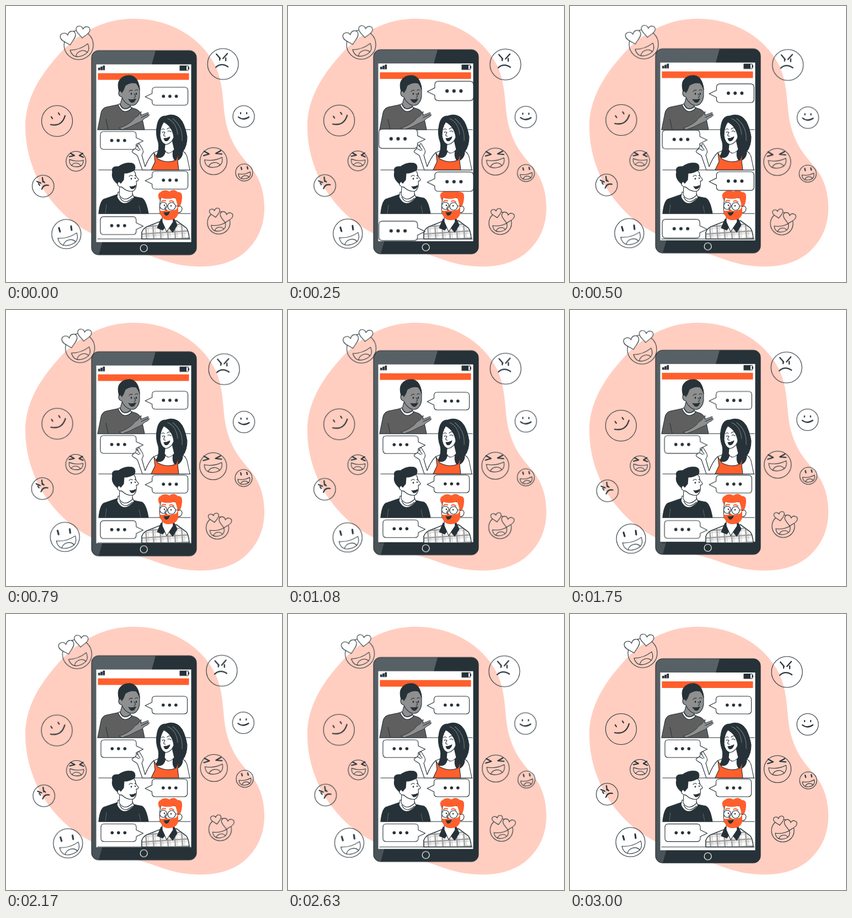
These frames come from a looping animation (500x500 px, 3.04 s). An HTML page:

```html
<!DOCTYPE html>
<html lang="en">
<head>
<meta charset="utf-8">
<title>Group video chat</title>
<style>
  html, body { margin: 0; height: 100%; overflow: hidden; background: #fff; }
  svg { display: block; width: 100vw; height: 100vh; }

  .line { fill: none; stroke: #263238; stroke-width: 1.1; stroke-linecap: round; stroke-linejoin: round; }
  .even { vector-effect: non-scaling-stroke; }
  .bold { stroke-width: 2.2; }
  .heavy { stroke-width: 3; }
  .brow { stroke: #ff5f2d; stroke-width: 2; }
  .white { fill: #fff; }
  .dark { fill: #263238; }
  .orange { fill: #ff5f2d; }
  .skin { fill: #8f8f8f; }

  .phone, .bubbles, .faces { animation: 3.04s linear -40ms infinite; }
  .phone { animation-name: float; }
  .bubbles { animation-name: heartbeat; transform-origin: 250px 281px; }
  .faces { animation-name: sway; transform-origin: 249px 238px; }

  @keyframes float { 50% { transform: translateY(-10px); } }
  @keyframes heartbeat {
    0%, 30%, 40%, 60%, 100% { transform: scale(1); }
    10%, 50% { transform: scale(1.1); }
  }
  @keyframes sway {
    0%, 100% { transform: rotate(0deg); }
    25% { transform: rotate(1deg); }
    75% { transform: rotate(-1deg); }
  }
</style>
</head>
<body>
<svg viewBox="0 0 500 500">
  <defs>
    <g id="mouth">
      <path class="even" d="M-17-3Q0 3 17-3Q18 14 0 14Q-18 14-17-3Z"/>
      <path class="even" d="M-11 11.500Q-8 5 0 5Q8 5 11 11.500"/>
    </g>
    <path id="heart" class="even" d="M0 13C-5 7-14 3-14-4C-14-12-3-13 0-5C3-13 14-12 14-4C14 3 5 7 0 13Z"/>
    <g id="dots" class="dark"><circle cx="20.300" cy="16" r="2.800"/><circle cx="31.800" cy="16" r="2.800"/><circle cx="43.300" cy="16" r="2.800"/></g>
    <g id="bubble">
      <path class="line white" d="M6 0H58Q64 0 64 6V26Q64 32 58 32H6Q0 32 0 26V23L-12.500 17L0 11V6Q0 0 6 0Z"/>
      <use href="#dots"/>
    </g>
    <g id="bubbleLeft">
      <path class="line white" d="M6 0H58Q64 0 64 6V11L76.500 17L64 23V26Q64 32 58 32H6Q0 32 0 26V6Q0 0 6 0Z"/>
      <use href="#dots"/>
    </g>
    <linearGradient id="gloss" x1="0" y1="0" x2="0" y2="1">
      <stop offset="0" stop-color="#fff" stop-opacity=".23"/>
      <stop offset="1" stop-color="#fff" stop-opacity=".16"/>
    </linearGradient>
    <pattern id="plaid" width="13" height="13" patternUnits="userSpaceOnUse" patternTransform="translate(249 396) rotate(-4)">
      <path d="M0 4H13M4 0V13" stroke="#999" stroke-width="2.600"/>
      <path d="M0 8H13M8 0V13" stroke="#aaa" stroke-width=".8"/>
    </pattern>
    <clipPath id="body"><rect x="155" y="81" width="190" height="370" rx="13"/></clipPath>
  </defs>

  <path fill="#ffcec0" d="M232 23C296 23 353 56 379 108C397 146 391 188 401 221C411 255 425 270 442 290C459 310 468 334 468 366C468 402 453 430 428 450C408 465 382 472 353 472C298 472 278 455 235 445C210 439 178 425 155 412C112 391 83 358 62 323C45 290 35 256 35 218C35 168 62 126 93 91C130 48 177 23 232 23Z"/>

  <g class="phone">
    <rect class="dark" x="155" y="81" width="190" height="370" rx="13"/>
    <path fill="url(#gloss)" clip-path="url(#body)" d="M155 81H271L168 451H155Z"/>
    <rect class="line" x="155" y="81" width="190" height="370" rx="13"/>
    <rect class="white" x="163.500" y="106" width="172" height="322"/>
    <g class="dark">
      <rect x="167" y="112" width="3.700" height="4.500"/>
      <rect x="171.200" y="110" width="3.700" height="6.500"/>
      <rect x="175.400" y="108" width="3.700" height="8.500"/>
      <rect x="315" y="108.500" width="12" height="8.500"/>
      <rect x="330" y="110.500" width="2" height="4.500"/>
    </g>
    <rect class="line" x="315" y="108.500" width="15" height="8.500"/>
    <rect class="orange" x="166.500" y="122" width="165" height="12"/>
    <circle class="dark" cx="249.700" cy="439" r="6.500" stroke="#fff" stroke-width="1.200"/>
  </g>

  <path class="line" d="M166 224H334M168 297H334M168 376H334M166 422H334"/>

  <!-- man in grey -->
  <g class="line">
    <path fill="#5f5f5f" d="M166 224L172 194Q174 185 182 183L206 178Q215 196 227 184L236 187Q244 191 246 200L251 224Z"/>
    <path class="white" d="M206 177Q212 193 226 182L227 186Q212 199 203 179Z"/>
    <path class="skin" d="M211 164L207 178Q213 192 225 182L226 176Z"/>
    <path class="skin" d="M207 151Q207 139 216 137L237 137Q243 143 242 157Q243 171 235 178Q228 183 219 177Q212 171 210 165Q203 163 204 156Q206 152 209 154Z"/>
    <path class="dark" d="M205 155Q201 141 206 134Q213 125 226 126Q240 129 242 151Q239 143 236 140Q226 137 216 144L213 152L210 157Q208 152 205 155Z"/>
    <path class="skin" stroke-width=".9" d="M205 221Q219 217 229 208Q233 202 239 199L245 191L244 198L257 193Q260 194 256 197L260 197Q258 201 252 203Q246 210 236 213Q224 220 211 224Z"/>
    <path d="M245 202L256 197M181 205L185 223M223 155Q226 151 229 153M234 153Q237 150 239 153M232 159Q237 164 232 166"/>
    <path class="dark" d="M222 169Q229 171 235 168Q232 177 226 174Z"/>
  </g>
  <g class="dark"><ellipse cx="227" cy="159" rx="1.300" ry="2"/><ellipse cx="236" cy="159" rx="1.300" ry="2"/></g>

  <!-- woman -->
  <g class="line">
    <path class="white" d="M283 250L281 260L267 266Q259 274 252 291L246 270Q251 264 246 257L241 249Q238 249 239 255L234 250Q231 251 234 258L229 262Q227 265 232 267L238 271L247 297H333L328 273Q325 263 315 261L300 250Z"/>
    <path class="dark" d="M290 199Q277 199 274 215Q270 232 276 247Q279 259 271 274Q287 278 289 261L304 255Q299 276 308 281Q320 276 320 264Q328 254 328 237Q325 220 319 209Q308 193 290 199Z"/>
    <path class="orange" d="M268 266L270 282L263 297H313L311 281L313 266L308 279Q292 286 275 277Z"/>
    <path class="white" d="M289 244L287 260Q293 273 305 260L301 243Z"/>
    <path class="white" d="M286 210Q279 219 279 235Q281 249 290 251Q300 249 304 238Q302 219 286 210Z"/>
    <path class="dark" d="M286 240Q292 240 297 237Q294 246 288 244Z"/>
    <path d="M282 224Q285 221 287 224M292 223Q296 219 299 222M283 229Q285 227 288 229M293 227Q296 225 299 228M288 229Q283 236 289 236M235 259L241 262M239 255L243 261"/>
    <path stroke="#6d777b" d="M293 204Q309 211 311 233M302 204Q321 219 319 244"/>
  </g>

  <!-- man in black -->
  <g class="line">
    <path class="dark" d="M168 376Q170 355 177 350L203 341Q212 364 231 345L246 348Q254 352 258 376Z"/>
    <path class="white" d="M203 337L201 346Q212 369 232 347L229 340Z"/>
    <path class="white" d="M206 327L205 342Q214 357 229 343L229 335Z"/>
    <path class="white" d="M207 303L226 297Q235 297 235 308L240 314Q239 318 236 317Q238 329 231 335Q220 338 210 328Q202 328 201 320Q204 316 208 321Z"/>
    <path class="dark" d="M202 322Q190 313 193 301Q190 290 204 291Q216 282 229 285Q236 288 233 297Q224 303 214 303L213 315L208 321Q204 315 202 322Z"/>
    <path class="dark" d="M224 327Q231 328 235 325Q233 332 227 331Z"/>
    <path d="M223 309Q226 305 229 308M233 307L236 308M206 346Q214 362 229 348"/>
    <path stroke="#59656a" d="M241 362L244 375M182 360L180 375"/>
  </g>
  <g class="dark"><circle cx="227" cy="313" r="1.400"/><circle cx="234" cy="312" r="1.200"/></g>

  <!-- man in plaid -->
  <g class="line">
    <path class="white" d="M246 422V410Q249 402 257 399L280 390L309 389L324 400Q331 404 332 422Z"/>
    <path fill="url(#plaid)" d="M246 422V410Q249 402 257 399L280 390L309 389L324 400Q331 404 332 422Z"/>
    <path class="dark" d="M281 386L274 402L284 406L291 397L302 410L310 397L304 384Z"/>
    <path class="white" d="M283 383L283 391L291 409L303 391L302 383Z"/>
    <path class="white" d="M281 346Q277 360 279 376Q288 389 304 382L310 374Q318 376 319 367Q318 361 312 363L312 348Z"/>
    <path class="orange" stroke="none" d="M279 353Q272 341 280 337Q287 331 296 336Q304 330 311 337Q320 336 319 348Q318 358 315 363L311 364Q309 352 306 347Q292 352 280 347Z"/>
    <path class="orange" stroke="none" d="M278 370Q285 373 290 369Q299 374 309 368L312 362L312 376Q309 388 294 388Q281 388 278 370Z"/>
    <path class="dark" d="M286 374Q291 375 296 373Q294 380 289 379Z"/>
    <circle cx="285" cy="362" r="6.500"/><circle cx="300" cy="363" r="7"/>
    <path d="M307 362L314 363M291 362L293 362M289 363Q286 370 291 369"/>
    <path class="brow" d="M282 354Q285 351 289 353M296 354Q300 351 304 355"/>
  </g>
  <g class="dark"><circle cx="287" cy="361" r="1.300"/><circle cx="299" cy="362" r="1.300"/></g>

  <g class="bubbles">
    <use href="#bubble" x="264.500" y="149"/>
    <use href="#bubbleLeft" x="172" y="228"/>
    <use href="#bubble" x="264.500" y="299"/>
    <use href="#bubbleLeft" x="172" y="380.300"/>
  </g>

  <g class="faces line">
    <circle cx="131.500" cy="70.700" r="26.500"/>
    <use href="#mouth" transform="translate(133 77) rotate(-20)"/>
    <use href="#heart" class="white" transform="translate(113 58) rotate(-14)"/>
    <use href="#heart" class="white" transform="translate(139 46.500) rotate(5) scale(.9)"/>

    <circle cx="393" cy="105" r="28"/>
    <path class="bold" d="M381 87L388 95M401 86L393 95M387 94V98M398 94V99M380 111Q390 102 402 110"/>

    <circle cx="92.500" cy="208.500" r="28"/>
    <path class="bold" d="M82 201L84 204M95 194L97 197M81 215Q101 219 107 199"/>

    <circle cx="430.500" cy="200" r="19.500"/>
    <path class="bold" d="M425 193V195M436 193V195M421 201Q430 208 440 201"/>

    <circle cx="126.800" cy="281.500" r="18"/>
    <path class="bold" d="M117 267L124 271L115 273M139 267L133 271L140 274"/>
    <use href="#mouth" transform="translate(127.500 281) rotate(3) scale(.74)"/>

    <circle cx="376" cy="281" r="24.500"/>
    <path class="bold" d="M359 263L368 268L358 271M389 262L380 267L391 268"/>
    <use href="#mouth" transform="translate(376 279) rotate(-8) scale(.94)"/>

    <circle cx="431.500" cy="301.500" r="15.500"/>
    <path class="bold" d="M426 292L427 296M437 291L438 295"/>
    <use href="#mouth" transform="translate(432 304) rotate(-10) scale(.64)"/>

    <circle cx="109.500" cy="413.300" r="26.500"/>
    <path class="heavy" d="M96 402L98 409M118 399L119 406"/>
    <use href="#mouth" transform="translate(112 419) rotate(-16) scale(1.040)"/>

    <circle cx="385.500" cy="392.500" r="20.500"/>
    <use href="#mouth" transform="translate(385 397) rotate(-10) scale(.76)"/>
    <use href="#heart" fill="#ffcec0" transform="translate(378.500 374) rotate(-10) scale(.68)"/>
    <use href="#heart" fill="#ffcec0" transform="translate(399 382) rotate(10) scale(.82)"/>

    <circle cx="67.300" cy="326.500" r="19.700"/>
    <path class="bold" d="M56 318L63 321M66 311L67 319M59 322L61 325M68 318L70 320M65 332Q68 323 77 325"/>
  </g>
</svg>
</body>
</html>
```
